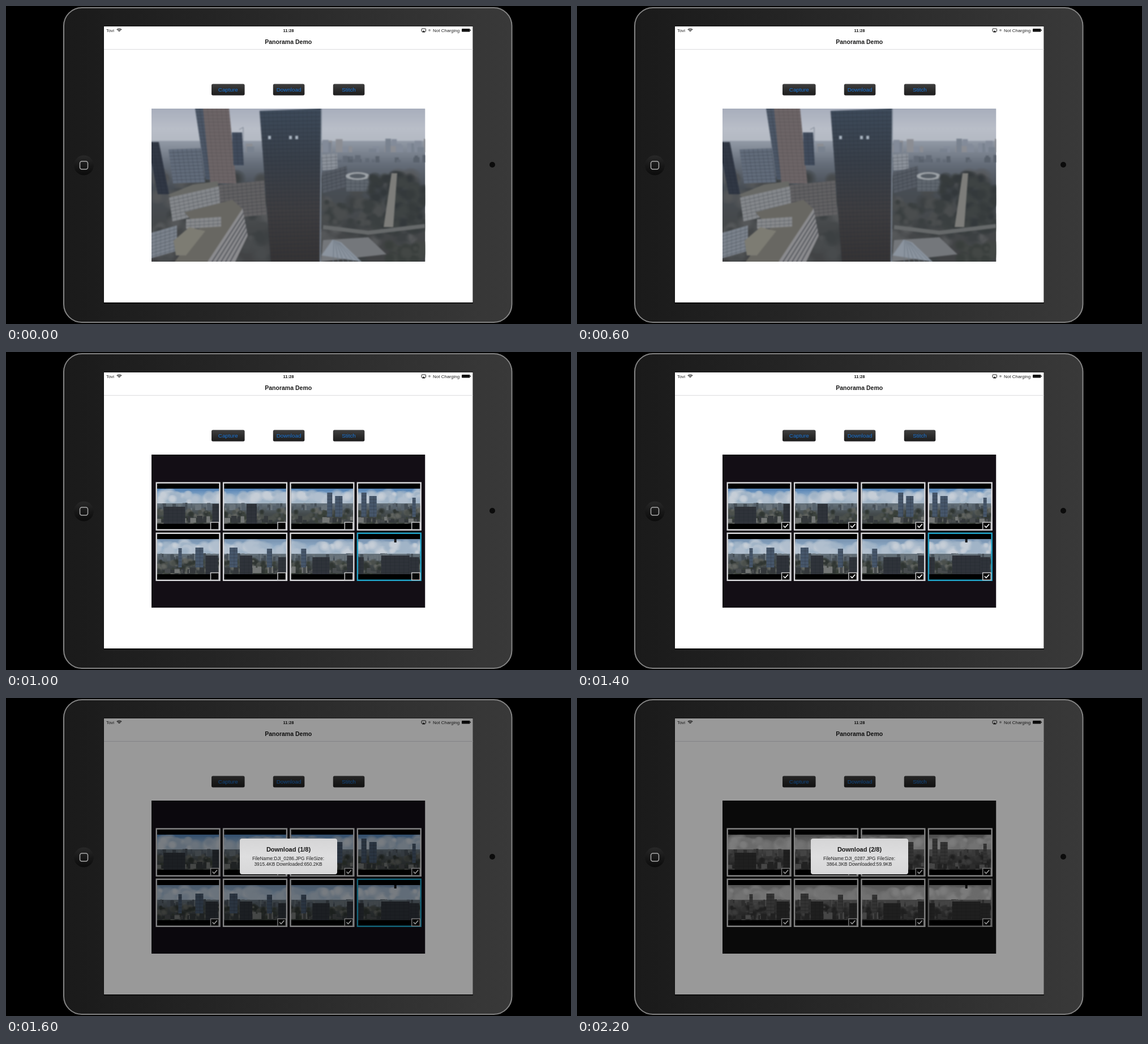
Write an HTML page with a canvas that moves like this. It is 998 px wide and 561 px high and loops after 2.4 s.

```html
<!DOCTYPE html>
<html lang="en">
<head>
<meta charset="utf-8">
<title>Panorama Demo</title>
<style>
html, body { margin: 0; width: 100%; height: 100%; overflow: hidden; background: #000; }
canvas { display: block; width: 998px; height: 561px; }
</style>
</head>
<body>
<canvas id="stage" width="998" height="561"></canvas>
<script>
const W = 998, H = 561, LOOP = 2400;
const FONT = '"Liberation Sans", Arial, sans-serif';
const VIEW = { x: 257, y: 181, w: 483.5, h: 270 };
const SCREEN = { x: 173, y: 36, w: 651.5, h: 487 };
const stage = document.getElementById('stage').getContext('2d');
let g = stage;

// ---------- helpers ----------
function rng(seed) {
  return () => (seed = (seed * 16807) % 2147483647) / 2147483647;
}

function rect(color, x, y, w, h) {
  g.fillStyle = color;
  g.fillRect(x, y, w, h);
}

function round(color, x, y, w, h, r, width) {
  g.beginPath();
  g.roundRect(x, y, w, h, r);
  g.fillStyle = g.strokeStyle = color;
  g.lineWidth = width;
  if (width) g.stroke(); else g.fill();
}

function trace(pts) {
  g.beginPath();
  for (let i = 0; i < pts.length; i += 2) g.lineTo(pts[i], pts[i + 1]);
}

function poly(color, ...pts) {
  trace(pts);
  g.fillStyle = color;
  g.fill();
}

function line(color, width, ...pts) {
  trace(pts);
  g.strokeStyle = color;
  g.lineWidth = width;
  g.stroke();
}

function disc(color, x, y, rx, ry = rx) {
  g.beginPath();
  g.ellipse(x, y, rx, ry, 0, 0, 7);
  g.fillStyle = color;
  g.fill();
}

// colours spread evenly from top to bottom
function fade(y0, y1, ...colors) {
  const f = g.createLinearGradient(0, y0, 0, y1);
  colors.forEach((c, i) => f.addColorStop(i / (colors.length - 1), c));
  return f;
}

function text(str, x, y, size, color, align = 'center', weight = 'normal') {
  g.font = `${weight} ${size}px ${FONT}`;
  g.textAlign = align;
  g.fillStyle = color;
  g.fillText(str, x, y);
}

function layer(draw, filter = 'none') {
  const c = document.createElement('canvas');
  c.width = W;
  c.height = H;
  const before = g;
  g = c.getContext('2d');
  g.filter = filter;
  draw();
  g = before;
  return c;
}

function clipped(x, y, w, h, draw) {
  g.save();
  g.beginPath();
  g.rect(x, y, w, h);
  g.clip();
  draw();
  g.restore();
}

// ---------- scenery ----------
// soft round patches strewn over a box
function puffs(seed, n, x, y, w, h, size, ...colors) {
  const r = rng(seed);
  for (let i = 0; i < n; i++) {
    const c = colors[i % colors.length], s = size * (.6 + r());
    const px = x + r() * w, py = y + r() * h;
    const soft = g.createRadialGradient(px, py, s * .3, px, py, s);
    soft.addColorStop(0, c);
    soft.addColorStop(1, c + '00');
    disc(soft, px, py, s, s * .8);
  }
}

function skyline(seed, n, x, base, w, high, ...colors) {
  const r = rng(seed);
  for (let i = 0; i < n; i++) {
    const h = high * (.25 + .75 * r());
    rect(colors[i % colors.length], x + r() * w, base - h, w / n * (.7 + r()), h);
  }
}

// a leaning wall with faint floors and window columns
function block(color, x, y, w, h, lean = 0, rise = 0, ink = '#20252c55') {
  poly(color, x, y, x + w, y - rise, x + w + lean, y + h - rise, x + lean, y + h);
  for (let v = 6; v < h; v += 6) {
    const a = x + lean * v / h;
    line(ink, 1.2, a, y + v, a + w, y + v - rise);
  }
  for (let u = 8; u < w; u += 8) {
    const top = y - rise * u / w;
    line(ink, .7, x + u, top, x + u + lean, top + h);
  }
}

function hazyCity() {
  const { x, w } = VIEW;
  rect(fade(181, 250, '#a8aebc', '#b9bec8', '#b1b7c0'), x, 181, w, 70);
  rect(fade(238, 320, '#929aa6', '#656d79', '#484e55'), x, 238, w, 82);
  rect(fade(320, 451, '#484e55', '#45484a', '#414244'), x, 320, w, 131);
  skyline(11, 40, 390, 258, 350, 24, '#838b99', '#79828f', '#8b8d93');
  skyline(8, 30, 555, 276, 185, 14, '#626a76', '#59616c');
  puffs(61, 150, x, 300, w, 150, 14, '#3c4042', '#484b4d', '#555759');

  block('#303744', 250, 240, 20, 92, 18);
  block('#626c7b', 287, 253, 57, 60, 8, 2);
  block('#4c5767', 334, 181, 15, 125, 19);
  block('#6d6567', 348, 181, 46, 132, 13, 0, '#4a454a66');
  block('#404b5c', 399, 223, 18, 58, 3);
  line('#757d8a', 1, 419, 240, 419, 214, 412, 218);
  poly('#686966', 286, 333, 330, 315, 374, 309, 376, 326, 300, 342);
  block('#85888c', 288, 338, 88, 42, 6, 20);
  block('#626163', 376, 316, 80, 60, 4, 8);
  poly('#686762', 315, 364, 400, 342, 418, 358, 358, 451, 298, 451, 342, 394);
  block('#888a8d', 318, 376, 62, 17, 0, 4);
  poly('#8b8b8e', 418, 357, 427, 405, 405, 451, 356, 451);
  for (let i = 1; i < 6; i++) line('#4d5056', 1.6, 418 + i * 1.6, 357 + i * 8, 356 + i * 8, 451);
  block('#7c838d', 257, 400, 45, 45, 0, 13);
  poly('#7d7c73', 296, 414, 324, 390, 352, 397, 318, 440, 300, 440);

  block('#8c929b', 558, 262, 27, 28, 1, 2);
  block('#555b64', 558, 294, 44, 36, 2, 12);
  block('#60676f', 601, 301, 40, 26);
  disc('#9da2a7', 621, 300, 21, 7);
  disc('#565d65', 621, 300, 14, 4);
  puffs(23, 130, 645, 300, 95, 95, 10, '#363b3c', '#3e4343', '#33383b');
  puffs(24, 60, 560, 345, 100, 40, 9, '#3a3f40', '#4a4d4e');
  poly('#7d7d7a', 681, 295, 691, 295, 684, 390, 667, 390);
  line('#66696a', 7, 560, 390, 640, 400, 740, 388);
  poly('#74777b', 560, 413, 640, 408, 672, 438, 556, 451);
  puffs(71, 50, 675, 420, 65, 30, 9, '#393e3c', '#434745');
  poly('#8b949f', 557, 440, 577, 412, 592, 417, 628, 451);
  for (let i = 0; i < 6; i++) line('#6c7681', 1, 579 + i * 2, 413 + i, 578 + i * 9, 451);

  poly(fade(181, 451, '#3d4a5a', '#383f49', '#3e3d40', '#353334'), 448, 185, 557, 181, 555, 451, 468, 451);
  for (let y = 190; y < 451; y += 7) line('#262d3650', 1.5, 448 + (y - 185) * .075, y, 557, y - 2);
  for (let u = 0; u < 1; u += .07) line('#262d3638', 1, 448 + u * 109, 185, 468 + u * 87, 451);
  for (const u of [465, 502, 513]) rect('#a6b1bd', u - 2, 229, 5, 6);
  line('#7d8794', 2, 557, 181, 555, 451);
}

function sunnyCity() {
  const { x, w } = VIEW;
  rect(fade(181, 295, '#8eaed2', '#5a99d8', '#76a9dc', '#a0bbd5', '#a9bccd'), x, 181, w, 115);
  puffs(3, 60, x, 178, 230, 12, 15, '#b7c4d5', '#c5cdd9', '#a9bcd4');
  puffs(17, 55, x, 205, 85, 45, 18, '#b4c1d1', '#c2cbd7', '#a6b8ce');
  puffs(9, 75, x, 240, 220, 34, 18, '#b3bfcd', '#c9cfd8', '#bdc7d3');
  puffs(12, 45, 398, 210, 58, 42, 15, '#cbd2dd', '#dbdfe6', '#bcc8d5');
  puffs(27, 80, 605, 235, 135, 30, 19, '#c9d0da', '#d9dee5', '#bac6d4');
  puffs(13, 45, 665, 190, 75, 45, 18, '#d8dde4', '#c9d2de');
  rect(fade(262, 296, '#9db4ca00', '#9db4ca', '#8fa5b8'), x, 262, w, 34);
  rect(fade(292, 330, '#72808b', '#4a545a', '#3c443e'), x, 292, w, 38);
  rect(fade(330, 451, '#3c443e', '#333836', '#2c2f30'), x, 330, w, 121);
  rect('#9fafbc', 542, 293, 140, 5);
  skyline(7, 60, x, 318, 300, 25, '#4f5a66', '#67727d', '#434d57', '#7b8389');
  puffs(51, 110, x, 325, 155, 32, 8, '#353f36', '#434c43', '#4d574b');
  line('#777e79', 2, 257, 334, 330, 325, 411, 321);
  puffs(53, 60, 378, 360, 50, 90, 10, '#2c3729', '#36422f');
  poly('#8e8f88', 400, 352, 409, 353, 380, 434, 368, 424);

  const ink = '#50505a40';
  block('#23222a', 411, 300, 60, 130, 0, 2, ink);
  block('#2b2b32', 447, 313, 54, 138, 0, 0, ink);
  block('#292c34', 570, 301, 93, 22, 0, 2, ink);
  block('#5d6068', 680, 286, 50, 24, 2, 2);
  block('#292a32', 671, 307, 56, 82, -4, 0, ink);
  block('#303138', 727, 308, 14, 70, 0, 10, ink);
  poly('#54565b', 447, 313, 522, 312, 637, 318, 640, 324, 498, 320);
  block('#302f37', 498, 319, 141, 132, -4, -4, ink);
  block('#3d3f49', 638, 326, 30, 122, -2, 3);
  block('#797d85', 662, 336, 24, 52, -3, -3);
  block('#50535b', 658, 386, 25, 62, -3);
  puffs(57, 70, 685, 385, 55, 66, 9, '#343d30', '#444a40', '#575a55');
  line('#94948e', 4, 738, 385, 700, 451);

  poly('#5f6365', 257, 350, 357, 337, 369, 377, 257, 396);
  for (let i = 0; i < 5; i++) line('#b5b6b4', 2, 257, 352 + i * 10, 356 + i * 3, 339 + i * 9);
  block('#282d33', 257, 397, 113, 74, 2, 20, '#60656a55');
  rect('#1d519d', 298, 393, 26, 26);
  rect('#1c5f75', 569, 335, 17, 17);
  for (const [cx, top] of [[610, 284], [633, 289], [688, 272], [728, 274]]) {
    line('#6a6462', 1, cx, top + 14, cx, top, cx - 7, top + 4);
    line('#6a6462', 1, cx - 7, top + 4, cx + 5, top + 3);
  }
  poly('#17181d', 543, 181, 564, 181, 562, 197, 553, 207, 542, 202);
}

// landmarks round the horizon: place, width, height
const LAP = 464;
const landmarks = [
  [12, 38, 30], [98, 18, 35], [180, 9, 55], [194, 13, 49], [270, 6, 46],
  [300, 14, 47], [318, 22, 33], [366, 9, 45], [386, 30, 30], [447, 50, 33]
];

// each thumbnail turns the camera by an eighth of a lap
function miniature(i, x, y) {
  g.translate(x - i * LAP / 8, y);
  const span = LAP + 110;
  rect(fade(0, 28, i < 4 ? '#4f80b5' : '#7590ae', '#92adc7', '#a9b8c4'), 0, 0, span, 30);
  puffs(101, 190, 0, 9, span, 14, 9, '#b1bfce', '#c6ced7', '#a1b4c7');
  rect(fade(25, 62, '#687580', '#454c4e', '#34393a'), 0, 26, span, 37);
  skyline(211, 150, 0, 38, span, 13, '#56616b', '#454e56', '#69737a');
  puffs(307, 420, 0, 38, span, 26, 5, '#394039', '#4b504c', '#60635f', '#2f3532');
  skyline(401, 90, 0, 60, span, 13, '#474b4d', '#737675', '#34383b');
  for (const [mx, w, h] of landmarks) {
    for (const u of [mx, mx + LAP]) {
      block(w < 15 ? '#46566a' : '#2f333a', u, 62 - h, w, w < 15 ? h - 12 : h);
    }
  }
  if (i === 7) rect('#15161a', 7 * LAP / 8 + 64, 0, 4, 6);
}

function album(checked, plain) {
  rect(plain ? '#111' : '#130e15', VIEW.x, VIEW.y, VIEW.w, VIEW.h);
  for (let i = 0; i < 8; i++) {
    const x = 264.5 + (i % 4) * 118.4, y = i < 4 ? 229.5 : 318.5;
    rect('#000', x, y, 114, 85.5);
    clipped(x + 2.5, y + 11.5, 109.5, 62, () => miniature(i, x + 2, y + 11.5));
    round(i < 7 ? '#d9d9dc' : plain ? '#8c8c8c' : '#20a4c8', x + 1.2, y + 1.2, 111.8, 83, 0, 2.4);
    rect('#050505', x + 97, y + 71, 14.5, 12.8);
    round('#c5c5c7', x + 97, y + 71, 14.5, 12.8, 0, 1.5);
    if (checked) line('#f2f2f2', 1.8, x + 100.2, y + 77, x + 103, y + 80, x + 108.5, y + 74);
  }
}

// ---------- tablet ----------
function device() {
  const { x, y, w, h } = SCREEN;
  rect('#000', 0, 0, W, H);
  const shell = g.createLinearGradient(102, 0, 894, 0);
  shell.addColorStop(0, '#1a1a1a');
  shell.addColorStop(1, '#393939');
  round(shell, 102, 3, 792, 555, 32);
  round('#858585', 102, 3, 791.5, 555, 32, 2);
  disc(fade(263, 299, '#292929', '#181818', '#0b0b0b'), 137.5, 281, 17.5);
  round('#aaa', 130.5, 274, 14, 14, 3.5, 1.5);
  disc('#0b0b0b', 859, 280, 5);
  rect('#050505', x - .5, y - .5, w + 1, h + 2);
  rect('#fff', x, y, w, h);
  rect('#dcdcde', x, 76, w, 1);

  text('Tovi', 177, 45.5, 7.8, '#222', 'left');
  for (const r of [2, 4, 6]) {
    g.beginPath();
    g.arc(200, 46, r, -2.35, -.8);
    g.strokeStyle = '#222';
    g.lineWidth = 1.2;
    g.stroke();
  }
  text('11:28', 499, 45.5, 7.5, '#111', 'center', 'bold');
  round('#222', 734, 40, 7.5, 5, 1, 1);
  poly('#222', 735, 46.5, 737.7, 43, 740.5, 46.5);
  disc('#a0a0a0', 748, 42.7, 2);
  text('Not Charging', 754, 45.5, 8, '#222', 'left');
  round('#111', 805, 40, 14.5, 5.5, 1);
  rect('#111', 820, 41.7, 1, 2);
  text('Panorama Demo', 498.7, 66.5, 10.5, '#1a1a1a', 'center', 'bold');
}

function button(label, x, w, off) {
  if (!off) round('#d2ced2', x, 138.2, w, 20, 3);
  round(off ? '#cfcfd1' : fade(137, 158, '#404040', '#2d2d2d', '#1c1c1c'), x, 137.5, w, 20, 2.5);
  text(label, x + w / 2, 151.2, 9.8, off ? '#b2bac8' : '#1873d5');
}

function dialog(scale, alpha, part, size, got) {
  g.save();
  g.translate(499, 279.5);
  g.scale(scale, scale);
  g.globalAlpha = alpha;
  round(fade(-32, 32, '#d5d5d6', '#dededf', '#d7d7d8'), -86, -31.5, 172, 63, 4);
  g.globalAlpha = 1;
  text(`Download (${part}/8)`, 0, -8.2, 11, '#151515', 'center', 'bold');
  text(`FileName:DJI_0${285 + part}.JPG FileSize:`, -.5, 6.4, 8.4, '#202020');
  text(`${size}KB Downloaded:${got.toFixed(1)}KB`, -.5, 16.6, 8.4, '#202020');
  g.restore();
}

function photo(draw, filter) {
  return layer(() => clipped(VIEW.x, VIEW.y, VIEW.w, VIEW.h, draw), filter);
}

// soften the whole picture without fading its edges
function soften(draw) {
  const sharp = photo(draw);
  return photo(() => {
    g.drawImage(sharp, 0, 0);
    g.filter = 'blur(.8px)';
    g.drawImage(sharp, 0, 0);
  });
}

const frame = layer(device);
const haze = soften(hazyCity);
const sunny = soften(sunnyCity);
const grid = photo(() => album(false));
const picked = photo(() => album(true));
const gray = photo(() => album(true, true), 'grayscale(1)');

// pictures with the time step at which each one gives way
const views = [[7, haze], [9, sunny], [13, grid], [17, picked], [24, gray]];

function paint(t) {
  const step = Math.floor(t / 100);
  g.drawImage(frame, 0, 0);
  button('Capture', 363, 58.5);
  button('Download', 471.8, 55.5, step === 4 || step === 5);
  button('Stitch', 577.8, 55.5);
  g.drawImage(views.find(v => step < v[0])[1], 0, 0);
  if (step < 15) return;

  const opening = step === 15;
  rect(`rgba(0,0,0,${opening ? .215 : .4})`, SCREEN.x, SCREEN.y, SCREEN.w, SCREEN.h);
  const file = step < 22 ? [1, 3915.4, (step - 15) * 650.2] : [2, 3864.3, 59.9];
  dialog(opening ? 1.085 : 1, opening ? .74 : 1, ...file);
}

const start = performance.now();
function tick() {
  paint((performance.now() - start) % LOOP);
  requestAnimationFrame(tick);
}
tick();
</script>
</body>
</html>
```
